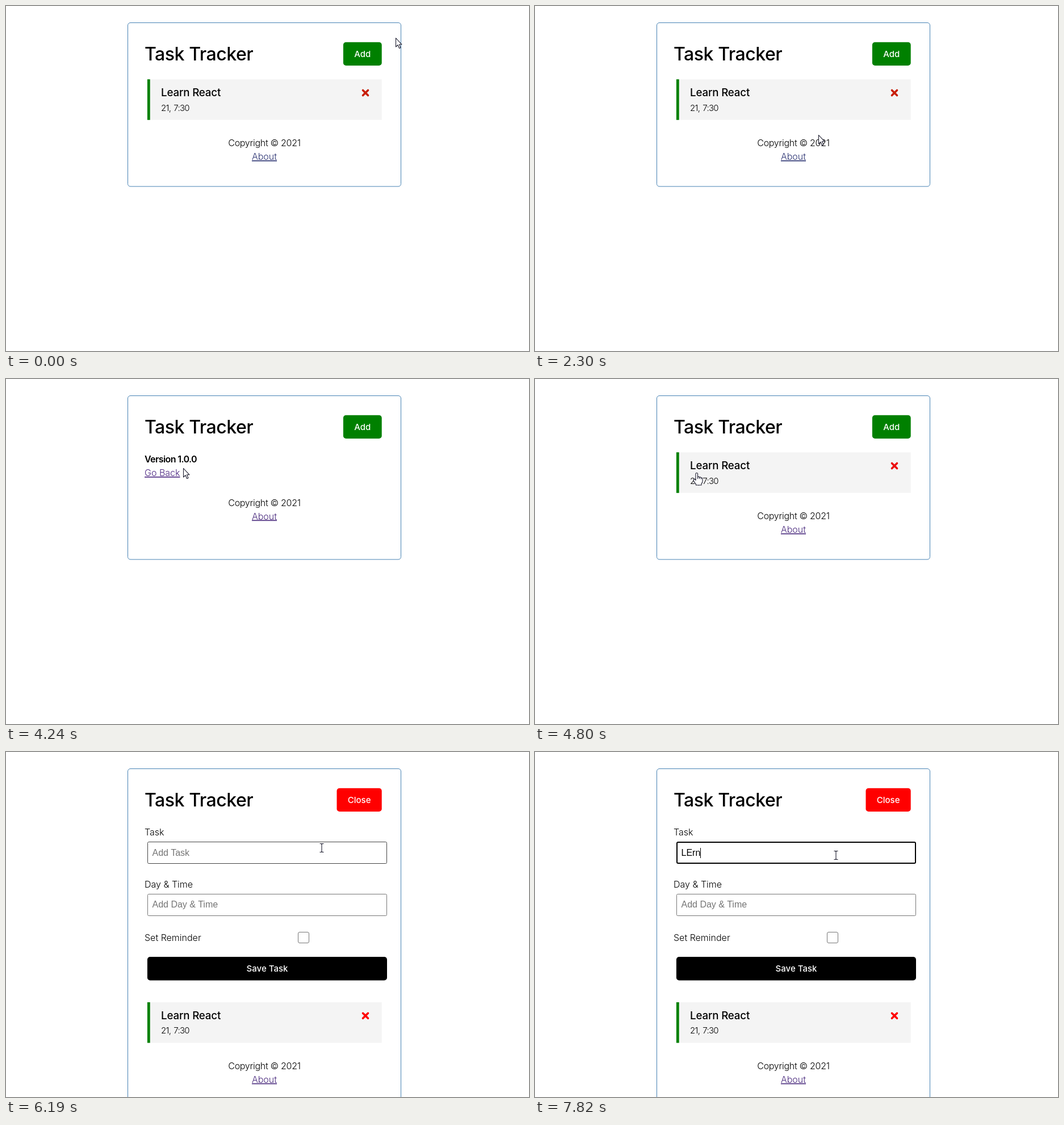
Animation of 921 by 608 pixels, one loop 8 s. Source, as an HTML page:

```html
<!DOCTYPE html>
<html lang="en">
<head>
<meta charset="utf-8">
<title>Task Tracker</title>
<style>
  html, body { margin: 0; width: 100%; height: 100%; overflow: hidden; background: #fff; }
  svg { display: block; width: 921px; height: 608px; font: 350 16px Inter, sans-serif; }
  .mid { text-anchor: middle; }
  .btn { font-size: 15px; font-weight: 450; fill: #fff; text-anchor: middle; }
  .link { text-decoration: underline; text-underline-offset: 1.5px; font-weight: 300; }
  .field { fill: #fff; stroke: #767676; }
  .typed { font-family: "Liberation Sans", Arial, sans-serif; font-weight: 400; }
  .hint { fill: #757575; }
  .cursor { fill: #fff; stroke: #1c1c2e; stroke-width: 1.1; stroke-linejoin: round; }
</style>
</head>
<body>
<svg viewBox="0 0 921 608">
  <rect id="card" x="214.5" y="29.5" width="481" rx="4.5" fill="none" stroke="#4682b4"/>
  <text x="244" y="96" font-size="32" font-weight="550" letter-spacing="-.45">Task Tracker</text>

  <g id="toggle">
    <rect id="toggleBox" y="63.8" height="41.2" rx="4.8"/>
    <text id="toggleText" class="btn" y="90"></text>
  </g>

  <g id="form">
    <text x="244" y="147">Task</text>
    <rect id="taskField" class="field" rx="2"/>
    <text id="taskText" class="typed" x="257.5" y="182.5"></text>
    <path id="caret" stroke="#000"/>
    <text x="244" y="238.5">Day &amp; Time</text>
    <rect class="field" x="249.5" y="250.5" width="421" height="38" rx="2"/>
    <text class="typed hint" x="257.5" y="274">Add Day &amp; Time</text>
    <text x="244" y="333">Set Reminder</text>
    <rect class="field" x="514.5" y="317.5" width="19" height="19" rx="2.5"/>
    <rect x="248.9" y="361" width="422.1" height="41.5" rx="4.8"/>
    <text class="btn" x="460" y="387">Save Task</text>
  </g>

  <g id="task">
    <path d="M248.9 129.2H661.7V200.8H248.9Z" fill="#f4f4f4"/>
    <path d="M248.9 129.2h4.8v71.6h-4.8z" fill="green"/>
    <text x="273" y="159" font-size="18.7" font-weight="550" letter-spacing="-.15">Learn React</text>
    <text x="273" y="184.5" font-size="15" letter-spacing="-.7" word-spacing="1.5">21, 7:30</text>
    <path id="cross" d="M628.5 148.5l9 9m0-9l-9 9" stroke-width="3.6" stroke-linecap="round"/>
  </g>

  <g id="version">
    <text x="244" y="147" font-weight="600" letter-spacing="-.6">Version 1.0.0</text>
    <text id="back" class="link" x="244" y="171">Go Back</text>
  </g>

  <g id="footer">
    <text class="mid" x="455" y="247" letter-spacing="-.3">Copyright © 2021</text>
    <text id="about" class="link mid" x="455" y="271">About</text>
  </g>

  <circle id="click" r="11" fill="#ff0" fill-opacity=".5"/>
  <g id="pointer" class="cursor">
    <path id="arrow" d="M.5 .5V16L4 12.7 6.6 18.5 9 17.4 6.5 11.8H11Z"/>
    <path id="hand" d="M-2 2Q-2 .5-.3 .5T1.5 2V7.5Q3 6.5 4.5 8.2 6.2 7.2 7.5 9 10 8.5 10 11.5V15Q10 18 8 19.5V22H-1.5V20.5Q-4 18-5.5 14.5-6.5 12-5 11.5-3.5 11-2 13.5ZM1.5 7.5V11M4.5 8.2V11M7.5 9V11.5"/>
    <path id="beam" fill="none" d="M-3.5-7.5H-1L0-6.5 1-7.5H3.5M0-6.5V6.5M-3.5 7.5H-1L0 6.5 1 7.5H3.5"/>
  </g>
</svg>
<script>
const LOOP = 8000;
const $ = Object.fromEntries([...document.querySelectorAll('[id]')].map(e => [e.id, e]));
const show = (el, on) => el.style.display = on ? '' : 'none';
const set = (el, attrs) => { for (const k in attrs) el.setAttribute(k, attrs[k]); };
const within = (t, a, b) => t >= a && t < b;

const easeIn = p => p ** 1.3;
const easeOut = p => 1 - (1 - p) ** 1.6;
const easeBoth = p => p * p * (3 - 2 * p);

// Pointer moves: first step, last step, number of steps, destination, easing
const start = [686, 56];
const moves = [
  [1300, 1840, 8, [637, 80], easeBoth],
  [2070, 2300, 4, [499, 227], easeIn],
  [2380, 2530, 3, [463, 281], easeOut],
  [2760, 3080, 5, [461, 271], easeOut],
  [3930, 4240, 5, [312, 157], easeIn],
  [4320, 4550, 4, [285, 165], easeOut],
  [5180, 5570, 6, [643, 86], easeBoth],
  [6040, 6190, 3, [556, 169], easeIn],
  [6270, 6350, 2, [530, 182], easeOut],
];
const clicks = [[4630, 4800], [5640, 5810], [6430, 6580]];
const FOCUS = 6430;
const typing = [[7510, 'L'], [7590, 'LE'], [7740, 'LEr'], [7820, 'LErn']];

function pointerAt(t) {
  let pos = start;
  for (const [from, to, steps, goal, ease] of moves) {
    if (t < from) break;
    const step = Math.floor((t - from) / (to - from) * (steps - 1) + 1e-6) + 1;
    const p = ease(Math.min(1, step / steps));
    pos = pos.map((v, i) => v + (goal[i] - v) * p);
  }
  return pos.map(Math.round);
}

function render(t) {
  const view = within(t, 3150, 4800) ? 'about' : t < 5810 ? 'list' : 'form';
  const isForm = view === 'form', isAbout = view === 'about';
  const [x, y] = pointerAt(t);
  const over = (x0, y0, x1, y1) => x >= x0 && x <= x1 && y >= y0 && y <= y1;
  const clicking = clicks.some(([a, b]) => within(t, a, b));

  show($.form, isForm);
  show($.task, !isAbout);
  show($.version, isAbout);
  set($.card, { height: isForm ? 640 : 288.5 });
  set($.task, { transform: `translate(0 ${isForm ? 311.8 : 0})` });
  set($.footer, { transform: `translate(0 ${isForm ? 311.8 : isAbout ? -23.5 : 0})` });
  set($.cross, { stroke: t < 3150 ? '#c81e0a' : isForm ? '#f00' : '#ec1010' });

  // Header button
  const left = isForm ? 582.5 : 593.9, right = 661.7, center = (left + right) / 2;
  const overButton = over(left, 64, right, 105);
  set($.toggleBox, { x: left, width: right - left, fill: isForm ? 'red' : 'green' });
  set($.toggleText, { x: center });
  $.toggleText.textContent = isForm ? 'Close' : 'Add';
  const scale = clicking && overButton ? .98 : 1;
  set($.toggle, { transform: `translate(${center} 84.5) scale(${scale}) translate(${-center} -84.5)` });

  // Links
  const overAbout = view === 'list' && over(432, 254, 478, 278);
  const overBack = isAbout && over(244, 154, 307, 178);
  set($.about, { fill: overAbout ? 'red' : t < 3150 ? '#283070' : '#48287c' });
  set($.back, { fill: overBack ? 'red' : '#4a2480' });

  // Task field
  const overField = isForm && over(249, 158, 671, 197);
  const focused = t >= FOCUS;
  const value = typing.filter(([at]) => t >= at).map(([, text]) => text).pop();
  const inset = focused ? 1 : .5;
  set($.taskField, { x: 249 + inset, y: 158 + inset, width: 422 - 2 * inset, height: 39 - 2 * inset });
  $.taskField.style.stroke = focused ? '#000' : overField ? '#444' : '';
  $.taskField.style.strokeWidth = focused ? 2 : 1;
  $.taskText.textContent = value || 'Add Task';
  set($.taskText, { class: value ? 'typed' : 'typed hint' });
  const caretX = Math.round(257 + (value ? $.taskText.getComputedTextLength() : 0)) + .5;
  set($.caret, { d: `M${caretX} 169V187` });
  show($.caret, value || within(t, FOCUS, 6960));

  // Pointer
  const overTask = view === 'list' && over(249, 129, 662, 201);
  const kind = overField ? 'beam' : overButton || overTask || overAbout || overBack ? 'hand' : 'arrow';
  for (const name of ['arrow', 'hand', 'beam']) show($[name], name === kind);
  set($.pointer, { transform: `translate(${x} ${y})` });
  set($.click, { cx: x - 1, cy: y - 1 });
  show($.click, clicking);
}

function frame() {
  render(performance.now() % LOOP);
  requestAnimationFrame(frame);
}
frame();
</script>
</body>
</html>
```
